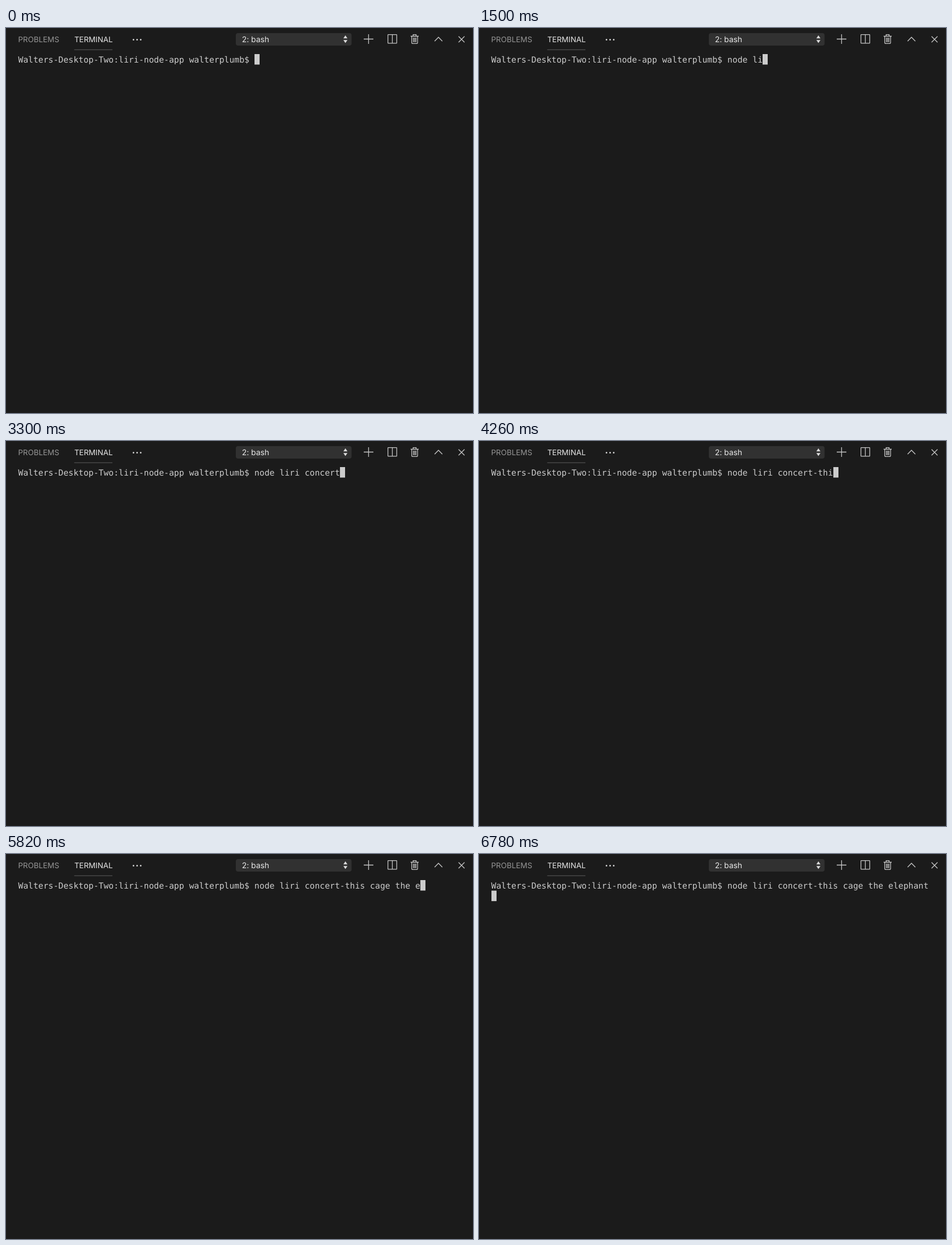
An HTML page that plays this animation: 825 px wide and 679 px high, repeating every 8000 ms.

```html
<!DOCTYPE html>
<html lang="en">
<head>
<meta charset="utf-8">
<title>Terminal typing</title>
<style>
  html, body { margin: 0; width: 100%; height: 100%; overflow: hidden; background: #1b1b1b; }
  svg { display: block; width: 825px; height: 679px; }
  text { text-rendering: geometricPrecision; white-space: pre; }
  .ui { font: 13.4px Inter, Roboto, sans-serif; fill: #e7e7e7; }
  .dim { fill: #969696; }
  .menu { font-size: 13.9px; }
  .term { font: 14.76px "DejaVu Sans Mono", "Liberation Mono", monospace; fill: #ccc; }
  .icon { fill: none; stroke: #c5c5c5; stroke-width: 1.3; }
  .solid { fill: #dcdcdc; }
  .dots { fill: none; stroke: #dcdcdc; stroke-width: 2.8; stroke-linecap: round; stroke-dasharray: 0 6.4; }
</style>
</head>
<body>
<svg viewBox="0 0 825 679">
  <rect width="825" height="679" fill="#1b1b1b"/>
  <text class="ui dim" x="21.5" y="25">PROBLEMS</text>
  <text class="ui" x="120.7" y="25">TERMINAL</text>
  <path d="M120.5 38.3H188" stroke="#5a5a5a"/>
  <path class="dots" d="M225.2 20.7h13"/>

  <rect x="406" y="9" width="204.5" height="22" rx="4" fill="#313131"/>
  <text class="ui menu" x="416.7" y="24.5">2: bash</text>
  <path class="solid" d="M596 18.3l3.6-5.3 3.6 5.3zM596 21.2h7.2l-3.6 5.3z"/>

  <g class="icon">
    <path d="M632 19.5h17M640.5 11v17"/>
    <rect x="674.7" y="11.7" width="15.6" height="15.2" rx=".6"/>
    <path d="M682.5 11.7v15.2"/>
    <path d="M714.8 14.5H729M719.3 14.3v-2.7h5.2v2.7"/>
    <path d="M716.7 14.5v11q0 1.9 1.9 1.9h6.6q1.9 0 1.9-1.9v-11M719.7 17v8M721.9 17v8M724.1 17v8"/>
    <path d="M757.2 23.3l6.8-7 6.8 7"/>
    <path d="M799.5 14.7L810 25.2M810 14.7L799.5 25.2"/>
  </g>

  <text class="term" id="line" x="21.5" y="61"></text>
  <rect id="cursor" width="9" height="18.5" fill="#ccc"/>
</svg>
<script>
  const LOOP = 8000, ENTER = 6780;
  const LEFT = 21.5, TOP = 46, ADVANCE = 8.886, LINE = 18.6;
  const PROMPT = "Walters-Desktop-Two:liri-node-app walterplumb$ ";

  // Bursts of even typing: text, time of its first and of its last key in ms
  const BURSTS = [
    ["n", 300, 300],
    ["ode", 720, 960],
    [" l", 1140, 1260],
    ["i", 1440, 1440],
    ["ri", 1740, 1860],
    [" ", 2340, 2340],
    ["concert", 2520, 3300],
    ["-", 3900, 3900],
    ["this", 4140, 4320],
    [" cage th", 4560, 5340],
    ["e", 5400, 5400],
    [" ", 5580, 5580],
    ["elephant", 5820, 6480]
  ];

  const line = document.getElementById("line");
  const cursor = document.getElementById("cursor");

  function typedPart([text, first, last], time) {
    if (time < first) return "";
    if (time >= last) return text;
    const gap = (last - first) / (text.length - 1);
    return text.slice(0, 1 + Math.floor((time - first) / gap));
  }

  function draw(time) {
    const text = PROMPT + BURSTS.map(burst => typedPart(burst, time)).join("");
    if (line.textContent !== text) line.textContent = text;
    const entered = time >= ENTER;
    const column = entered ? 0 : text.length;
    cursor.setAttribute("x", Math.round(LEFT + column * ADVANCE));
    cursor.setAttribute("y", TOP + (entered ? LINE : 0));
  }

  const start = performance.now();
  function tick() {
    draw((performance.now() - start) % LOOP);
    requestAnimationFrame(tick);
  }
  tick();
</script>
</body>
</html>
```
